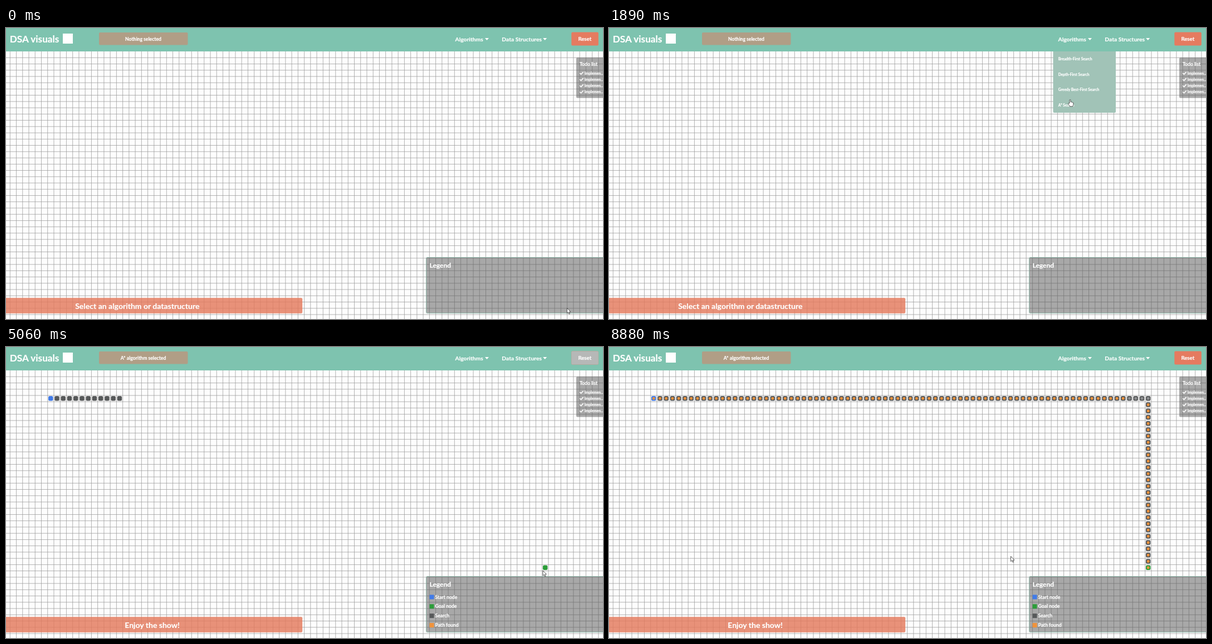
An HTML page for the animation above (8950 ms loop, 1072 by 522 pixels).

```html
<!DOCTYPE html>
<html lang="en">
<head>
<meta charset="utf-8">
<title>DSA visuals</title>
<style>
html, body { margin: 0; width: 100%; height: 100%; overflow: hidden; background: #fdfdfd; }
svg { display: block; width: 1072px; height: 522px; }
text { font: 700 8.6px Lato, "Open Sans", sans-serif; fill: #fff; stroke: #fff; stroke-width: .2px; }
.title { font-size: 17.2px; }
.nav { font-size: 10.3px; }
.reset { font-size: 9.6px; }
.item { font-size: 6.65px; }
.head { font-size: 12px; }
.hint { font-size: 14px; }
.mid { text-anchor: middle; }
.white { fill: #fff; }
.tick { fill: none; stroke: #fff; stroke-width: 1.6; }

.pick, .menu, .start, .goal, .show, .chosen, .ready, .busy, .fade { animation: 8950ms step-end infinite; }
.pick { animation-name: pick; }
.menu { animation-name: menu; }
.start { animation-name: start; }
.goal { animation-name: goal; }
.show { animation-name: show; }
.chosen { animation-name: chosen; }
.ready { animation-name: ready; }
.busy { animation-name: busy; }
.fade { animation-timing-function: linear; }
.tab { animation-name: tab; }
.row { animation-name: row; }
@keyframes pick { 0% { visibility: visible } 26.65%, 100% { visibility: hidden } }
@keyframes menu { 0% { visibility: hidden } 11.2% { visibility: visible } 26.65%, 100% { visibility: hidden } }
@keyframes start { 0% { visibility: hidden } 26.65% { visibility: visible } 36.26%, 100% { visibility: hidden } }
@keyframes goal { 0% { visibility: hidden } 36.26% { visibility: visible } 51.56%, 100% { visibility: hidden } }
@keyframes show { 0% { visibility: hidden } 51.56%, 100% { visibility: visible } }
@keyframes chosen { 0% { visibility: hidden } 26.65%, 100% { visibility: visible } }
@keyframes ready { 0% { visibility: hidden } 36.26%, 100% { visibility: visible } }
@keyframes busy { 0% { visibility: hidden } 51.56% { visibility: visible } 93.46%, 100% { visibility: hidden } }
@keyframes tab { 0%, 10.8% { opacity: 0 } 11.5%, 17% { opacity: 1 } 18.8%, 100% { opacity: 0 } }
@keyframes row { 0%, 21.12% { opacity: 0 } 23.35%, 26.64% { opacity: 1 } 26.65%, 100% { opacity: 0 } }
</style>
</head>
<body>
<svg viewBox="0 0 1072 522">
  <rect width="1072" height="522" fill="#fdfdfd"/>
  <path id="grid" stroke="#999" stroke-width=".75" fill="none"/>

  <rect id="hover" width="8.5" height="8.5" rx="2.5"/>
  <g id="cells"></g>

  <!-- bottom hint -->
  <rect x="-60" y="484.3" width="592" height="27.4" rx="2" fill="#e57b5d" fill-opacity=".82" stroke="#e57b5d" stroke-opacity=".5" stroke-width=".6"/>
  <g class="mid">
    <text class="hint pick" x="235.8" y="504">Select an algorithm or datastructure</text>
    <text class="hint start" x="235.8" y="504">Select your start node</text>
    <text class="hint goal" x="235.8" y="504">Select your goal node</text>
    <text class="hint show" x="262.6" y="504">Enjoy the show!</text>
  </g>

  <!-- legend -->
  <rect x="754.5" y="411.5" width="330" height="100" rx="2" fill="#555" fill-opacity=".5" stroke="#8fb8aa"/>
  <text class="head" x="760.5" y="430.3">Legend</text>
  <g id="legend"></g>

  <!-- todo list -->
  <rect x="1024" y="53" width="60" height="72.5" rx="2" fill="#555" fill-opacity=".5"/>
  <text x="1030" y="68">Todo list</text>
  <g id="todo"></g>

  <!-- header -->
  <rect width="1072" height="42" fill="#7ec3af"/>
  <text class="title" x="6.8" y="26">DSA visuals</text>
  <rect class="white" x="102" y="10" width="18" height="18"/>
  <rect x="167" y="8" width="159.5" height="22.5" rx="2" fill="#b09e86"/>
  <g class="mid">
    <text class="pick" x="246.5" y="22.5">Nothing selected</text>
    <text class="chosen" x="246.5" y="22.5">A* algorithm selected</text>
  </g>
  <rect class="fade tab" x="797.5" y="8" width="78.5" height="23" rx="2" fill="#b8977d"/>
  <text class="nav" x="806.5" y="23.5">Algorithms</text>
  <text class="nav" x="890.3" y="23.5">Data Structures</text>
  <path class="white" d="M860 18h7l-3.5 4zM964.2 18h7l-3.5 4z"/>
  <rect x="1015.3" y="7.5" width="48.5" height="24" rx="2" fill="#e57b60"/>
  <rect class="busy" x="1015.3" y="7.5" width="48.5" height="24" rx="2" fill="#b6b8b7"/>
  <text class="reset mid" x="1039.3" y="23.2">Reset</text>

  <!-- dropdown -->
  <g class="menu">
    <path d="M797.5 42h112.5v108a2 2 0 0 1-2 2h-108.5a2 2 0 0 1-2-2z" fill="#a1c3b7"/>
    <rect class="fade row" x="797.5" y="124.5" width="112.5" height="27.5" rx="2" fill="#b5a08b"/>
    <text class="item" x="806.7" y="58">Breadth-First Search</text>
    <text class="item" x="806.7" y="85.5">Depth-First Search</text>
    <text class="item" x="806.7" y="113">Greedy Best-First Search</text>
    <text class="item" x="806.7" y="140.5">A* Search</text>
  </g>

  <!-- pointers, tip at 0,0 -->
  <g stroke="#333" stroke-width=".8" stroke-linejoin="round" fill="#fff">
    <path id="arrow" d="M0 0V9.2L2.1 7.4L3.6 10.7L5 10.1L3.6 6.9L6.5 6.7Z"/>
    <path id="hand" d="M-1 6.6V1A1 1 0 0 1 1 1V4.2Q2.4 3.6 2.8 4.6Q4 4.2 4.4 5.2Q5.8 5 5.8 6.4V8.6Q5.6 10.6 4.6 12.2H-.4Q-1.4 10.4-3.2 7.8Q-3.6 6.4-2.2 6.2Z"/>
  </g>
</svg>
<script>
const LOOP = 8950, STEP = 11.24, COLS = 79, ROWS = 27;
const LEFT = 80.25, TOP = 92.3, CELL = 8.5;
const BLUE = '#417be8', GREEN = '#2c9d39', DARK = '#57595a', ORANGE = '#f0933c';
const $ = id => document.getElementById(id);

function add(parent, tag, attrs, text = '') {
  const el = document.createElementNS('http://www.w3.org/2000/svg', tag);
  for (const k in attrs) el.setAttribute(k, attrs[k]);
  el.textContent = text;
  return parent.appendChild(el);
}

function square(cx, cy, size, rx, fill, cls = '') {
  return add($('cells'), 'rect', {
    x: cx - size / 2, y: cy - size / 2, width: size, height: size, rx, fill, class: cls
  });
}

// grid
let d = '';
for (let x = 7.3; x < 1072; x += STEP) d += `M${x} 42V522`;
for (let y = 53.2; y < 522; y += STEP) d += `M0 ${y}H1072`;
$('grid').setAttribute('d', d);

// legend and todo rows
function key(row, color, label, cls) {
  const g = add($('legend'), 'g', { class: cls }), y = 448.5 + row * 16.85;
  add(g, 'rect', { x: 760.5, y: y - 4, width: 8, height: 8, fill: color });
  add(g, 'text', { x: 770.5, y: y + 3.1 }, label);
}
key(0, BLUE, 'Select start node (blue light)', 'start');
key(0, BLUE, 'Start node', 'ready');
key(1, GREEN, 'Select goal node (green light)', 'goal');
key(1, GREEN, 'Goal node', 'show');
key(2, DARK, 'Search', 'show');
key(3, ORANGE, 'Path found', 'show');

for (let i = 0; i < 4; i++) {
  const y = 83.7 + i * 11.2;
  add($('todo'), 'path', { class: 'tick', d: `M1030.3 ${y - 2.8}l2.2 2.2l4.2-4.4` });
  add($('todo'), 'text', { class: 'item', x: 1038.8, y }, 'Implemen...');
}

// route: along the top, then down to the goal
const LAST = COLS + ROWS;
const place = i => [LEFT + Math.min(i, COLS) * STEP, TOP + Math.max(0, i - COLS) * STEP];
const nodes = [], marks = [];
for (let i = 0; i <= LAST; i++) {
  const fill = i === 0 ? BLUE : i === LAST ? GREEN : DARK;
  const cls = i === 0 ? 'ready' : i === LAST ? 'show' : '';
  nodes.push(square(...place(i), CELL, 2.5, fill, cls));
}
for (let i = 0; i <= LAST; i++) {
  const corner = i > COLS - 4 && i <= COLS;
  marks.push(square(...place(i), 4.5, 1, corner ? '#8f9091' : ORANGE));
}

// pointer path: time, x, y, easing of the way there
const smooth = u => u * u * (3 - 2 * u), out = u => u * (2 - u), linear = u => u;
const path = [
  [0, 1007.5, 502.5, linear], [120, 1007.5, 502.5, linear], [980, 833.5, 24.5, smooth],
  [1380, 833.5, 24.5, linear], [1890, 828, 128.5, smooth], [2090, 828, 128.5, linear],
  [2280, 823, 127.5, smooth], [2400, 823, 127.5, linear], [3080, 79, 94, smooth],
  [3280, 79, 94, linear], [3640, 759, 348.5, out], [4100, 963, 401, linear],
  [4190, 964, 401, linear], [5300, 964, 401, linear], [6300, 691, 363, smooth],
  [8380, 693, 364, linear], [8860, 721.5, 375.5, smooth], [LOOP, 721.5, 375.5, linear]
];

function pointer(t) {
  const i = Math.max(1, path.findIndex(p => p[0] >= t));
  const [t0, x0, y0] = path[i - 1], [t1, x1, y1, ease] = path[i];
  const u = ease((t - t0) / (t1 - t0));
  return [x0 + (x1 - x0) * u, y0 + (y1 - y0) * u];
}

function draw(t) {
  const [x, y] = pointer(t), hand = t > 965 && t < 2385;
  $('arrow').style.display = hand ? 'none' : '';
  $('hand').style.display = hand ? '' : 'none';
  $(hand ? 'hand' : 'arrow').setAttribute('transform', `translate(${x} ${y})`);

  // the lit cell trails the pointer a little
  const hover = $('hover'), lit = t > 2385 && t < 4615;
  hover.style.display = lit ? '' : 'none';
  if (lit) {
    const [hx, hy] = pointer(t - 70);
    const col = Math.round((hx + .5 - LEFT) / STEP), row = Math.round((hy - 5 - TOP) / STEP);
    hover.setAttribute('x', LEFT + col * STEP - CELL / 2);
    hover.setAttribute('y', TOP + row * STEP - CELL / 2);
    hover.setAttribute('fill', t < 3245 ? '#9dbbf2' : '#95cf9b');
  }

  const found = Math.floor((t - 4850) / 18.4);
  for (let i = 1; i < LAST; i++) nodes[i].style.display = i <= found ? '' : 'none';
  marks.forEach((m, i) => {
    m.style.opacity = Math.min(1, Math.max(0, (t - 6780 - i * 15) / 200));
  });
}

let begin;
function frame(now) {
  begin ??= now;
  draw((now - begin) % LOOP);
  requestAnimationFrame(frame);
}
draw(0);
requestAnimationFrame(frame);
</script>
</body>
</html>
```
